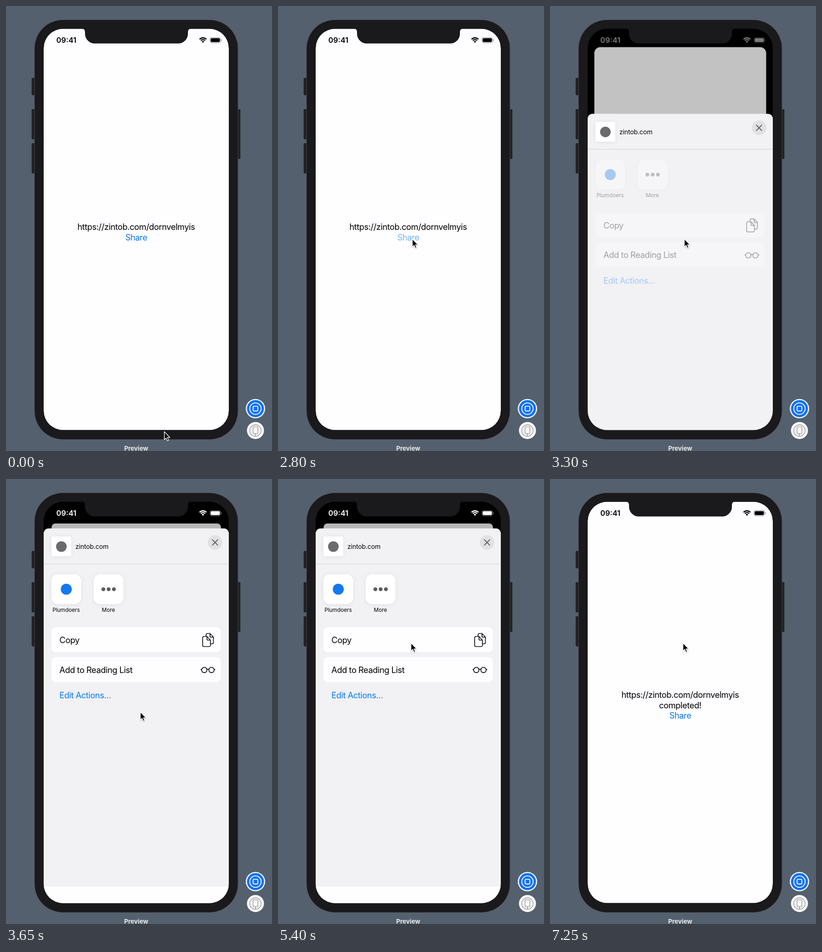
Recreate the animation shown at these times as an HTML page. Size 579 px wide and 968 px high, loop 8000 ms.

```html
<!DOCTYPE html>
<html lang="en">
<head>
<meta charset="utf-8">
<title>Share sheet preview</title>
<style>
  html, body { margin: 0; width: 100%; height: 100%; overflow: hidden; background: #54606e; }
  svg { display: block; width: 579px; height: 968px; }
  text {
    font-family: Inter, "Liberation Sans", sans-serif;
    font-optical-sizing: none;
    font-size: 18.27px;
    letter-spacing: -.025em;
    white-space: pre;
  }
  .mid { text-anchor: middle; }
  .blue { fill: #0579f2; }
  .small { font-size: 14px; letter-spacing: -.01em; }
  .label { font-size: 11.8px; letter-spacing: 0; }
  .clock { font-size: 16.3px; font-weight: 600; letter-spacing: 0; }
  .title { font-size: 13.4px; font-weight: 700; letter-spacing: 0; fill: #e9eaec; }
  .line { fill: none; stroke: #111; stroke-width: 1.7; stroke-linecap: round; stroke-linejoin: round; }
</style>
</head>
<body>
<svg viewBox="0 0 579 968" xmlns="http://www.w3.org/2000/svg">
  <defs>
    <clipPath id="screen"><rect x="82" y="49.5" width="403" height="873" rx="42"/></clipPath>
    <filter id="soft" x="-30%" y="-30%" width="160%" height="160%">
      <feDropShadow dx="0" dy="1" stdDeviation="5" flood-color="#000" flood-opacity=".07"/>
    </filter>
    <filter id="drop" x="-50%" y="-50%" width="200%" height="200%">
      <feDropShadow dx="0" dy="1" stdDeviation="1" flood-color="#000" flood-opacity=".35"/>
    </filter>
  </defs>

  <rect width="579" height="968" fill="#54606e"/>

  <!-- Phone body -->
  <g fill="#1e1e21" stroke="#38383c" stroke-width="1">
    <rect x="56" y="156.5" width="10" height="37.5" rx="2"/>
    <rect x="56" y="224.5" width="10" height="65.5" rx="2"/>
    <rect x="56" y="298.5" width="10" height="65.5" rx="2"/>
    <rect x="500" y="224.5" width="10" height="108" rx="2"/>
  </g>
  <rect x="62" y="30" width="443" height="913" rx="62" fill="#1a191c" stroke="#55565b" stroke-width=".8"/>

  <g clip-path="url(#screen)">
    <rect x="82" y="49" width="403" height="874" fill="#000"/>
    <g id="page">
      <rect id="paper" x="82" y="49.5" width="403" height="873" fill="#fefdff"/>
      <text id="url" class="mid" x="283.3" y="487">https://zintob.com/dornvelmyis</text>
      <text id="done" class="mid" x="283.3" y="498.5">completed!</text>
      <text id="share" class="mid blue" x="283.5" y="510">Share</text>
    </g>
    <rect id="dim" x="82" y="49" width="403" height="874" fill="#000"/>

    <g id="sheet">
      <rect x="82" y="107.5" width="403" height="1000" rx="10.7" fill="#f2f1f4"/>
      <rect x="82" y="886" width="403" height="250" fill="#fefdff"/>
      <rect x="99" y="125" width="43" height="43" rx="2" fill="#fff" filter="url(#soft)"/>
      <circle cx="120.5" cy="147" r="11.5" fill="#6b6b6e"/>
      <text class="small" x="151" y="152">zintob.com</text>
      <circle cx="455" cy="138" r="16" fill="#e1e0e3"/>
      <path d="M449.3 132.3l11.4 11.4m0-11.4l-11.4 11.4" class="line" style="stroke:#68686c;stroke-width:2.2"/>
      <rect x="82" y="184" width="403" height="1.2" fill="#d6d5d9"/>

      <g id="body">
        <rect x="99" y="207.5" width="64.5" height="64.5" rx="14" fill="#fff" filter="url(#soft)"/>
        <circle cx="131.2" cy="239.8" r="12" fill="#1478f0"/>
        <text class="label mid" x="131" y="289">Plumdoers</text>
        <rect x="191" y="207.5" width="64.5" height="64.5" rx="14" fill="#fff" filter="url(#soft)"/>
        <g fill="#5b5b5e">
          <circle cx="211.9" cy="239.8" r="4.1"/>
          <circle cx="223.4" cy="239.8" r="4.1"/>
          <circle cx="234.9" cy="239.8" r="4.1"/>
        </g>
        <text class="label mid" x="223" y="289">More</text>

        <rect x="99" y="322.5" width="368.5" height="54" rx="9" fill="#fefdff"/>
        <rect id="press" x="99" y="322.5" width="368.5" height="54" rx="9" fill="#d1d1d6"/>
        <text x="116.3" y="357">Copy</text>
        <path class="line" d="M431 342.5h6.5l7.5 8v11a3 3 0 0 1-3 3h-11a3 3 0 0 1-3-3v-16a3 3 0 0 1 3-3z
          M437.5 342.5v6q0 2 2 2h5.5
          M435.5 342v-3q0-3 3-3h5.5l7.5 8v11.5q0 3-3 3h-3
          M444 336v6q0 2 2 2h5.5"/>

        <rect x="99" y="387.5" width="368.5" height="54" rx="9" fill="#fefdff"/>
        <text x="116.3" y="421.5">Add to Reading List</text>
        <g class="line">
          <circle cx="431.7" cy="415.5" r="5.8"/>
          <circle cx="447.3" cy="415.5" r="5.8"/>
          <path d="M437.4 414.5q2.1-1.6 4.2 0M424 414.5h2m27.1 0h2"/>
        </g>
        <text class="blue" x="116.3" y="477">Edit Actions…</text>
      </g>
    </g>
  </g>

  <path fill="#1a191c" d="M164 48.5q8 1 8 8v4a21 21 0 0 0 21 21h182a21 21 0 0 0 21-21v-4q0-7 8-8z"/>

  <g id="status">
    <text class="clock" x="109.6" y="80">09:41</text>
    <g fill="none" stroke="currentColor" stroke-width="2.4">
      <path d="M421.3 72.4a10.4 10.4 0 0 1 14.8 0M424 75.1a6.6 6.6 0 0 1 9.4 0"/>
    </g>
    <path d="M428.7 80l-2.7-2.8a3.9 3.9 0 0 1 5.4 0z"/>
    <rect x="443.8" y="68.4" width="23.4" height="11.8" rx="3.6" fill="none" stroke="currentColor" stroke-opacity=".45"/>
    <rect x="445.5" y="70.1" width="20" height="8.4" rx="2.2"/>
    <path d="M468.3 72.3q1.4.6 1.4 2t-1.4 2z" opacity=".5"/>
  </g>

  <!-- Preview controls -->
  <circle cx="543" cy="875.8" r="21" fill="#fff"/>
  <circle cx="543" cy="875.8" r="18.6" fill="#0a70f8"/>
  <g fill="none" stroke="#fff" stroke-width="1.9">
    <circle cx="543" cy="875.8" r="12.4"/>
    <rect x="537.8" y="870.6" width="10.4" height="10.4" rx="2.2"/>
  </g>
  <circle cx="543" cy="923.4" r="18.5" fill="#fff"/>
  <g fill="none" stroke="#8c8c8e" stroke-width="1.4">
    <circle cx="543" cy="923.4" r="12.4"/>
    <rect x="537.6" y="915.4" width="10.8" height="15" rx="1.8"/>
    <path d="M543 930.4v5.4"/>
  </g>
  <text class="title mid" x="283.4" y="966.5">Preview</text>

  <g id="cursor" filter="url(#drop)">
    <path d="M0 0V17.4L3.9 13.8L6.5 20L9.4 18.8L6.8 12.7H12.2Z" fill="#000"
      stroke="#fff" stroke-width="1.3" stroke-linejoin="round"/>
  </g>
</svg>

<script>
const LOOP = 8000, STEP = 50;
const OPEN = 3109, CLOSE = 6008, DONE = 6550;

const el = {};
document.querySelectorAll("svg [id]").forEach(n => el[n.id] = n);

const clamp = x => Math.min(1, Math.max(0, x));
const ramp = (t, from, to) => clamp((t - from) / (to - from));
const smooth = x => x * x * (3 - 2 * x);
const mix = (a, b, k) => a + (b - a) * k;

// Critically damped spring, 0 to 1
function spring(ms) {
  const w = Math.max(0, ms) * 0.0174;
  return w > 9 ? 1 : 1 - (1 + w) * Math.exp(-w);
}

// Linear track through [time, value] pairs
function track(t, keys) {
  let value = keys[0][1];
  for (let i = 1; i < keys.length; i++) {
    const [a, from] = keys[i - 1], [b, to] = keys[i];
    if (t >= a) value = mix(from, to, ramp(t, a, b));
  }
  return value;
}

const shareFade = [[2799, 1], [2800, .56], [2850, .35], [2950, .35], [3100, 1]];
const copyPress = [[5549, 0], [5550, 1], [5750, 1], [5950, 0]];

function draw(t) {
  const p = spring(t - OPEN) - spring(t - CLOSE);
  const done = t >= DONE;

  // Page shrinks back behind the sheet
  const scale = 1 - .0853 * p;
  el.page.setAttribute("transform",
    `translate(283.5 ${49.5 + 47.3 * p}) scale(${scale}) translate(-283.5 -49.5)`);
  el.paper.setAttribute("rx", mix(42, 9, p));
  el.dim.setAttribute("opacity", .28 * p);
  el.sheet.setAttribute("transform", `translate(0 ${815 * (1 - p)})`);
  el.sheet.setAttribute("visibility", p > 0 ? "visible" : "hidden");
  el.body.setAttribute("opacity", ramp(t, 3180, 3540));
  el.press.setAttribute("opacity", track(t, copyPress));

  el.url.setAttribute("y", done ? 476 : 487);
  el.share.setAttribute("y", done ? 521 : 510);
  el.done.setAttribute("visibility", done ? "visible" : "hidden");
  el.share.setAttribute("opacity", track(t, shareFade));

  const light = Math.round(255 * (ramp(t, OPEN, OPEN + 400) - ramp(t, CLOSE, CLOSE + 400)));
  const tone = `rgb(${light},${light},${light})`;
  el.status.style.fill = el.status.style.color = tone;

  const a = smooth(ramp(t, 600, 1450)), b = smooth(ramp(t, 4450, 5350));
  const x = 344.6 - 52.2 * a - 2.9 * b;
  const y = 926 - 419.3 * a - 150 * b;
  el.cursor.setAttribute("transform", `translate(${x} ${y})`);
}

function tick() {
  const t = performance.now() % LOOP;
  draw(Math.floor(t / STEP) * STEP);
  requestAnimationFrame(tick);
}
tick();
</script>
</body>
</html>
```
